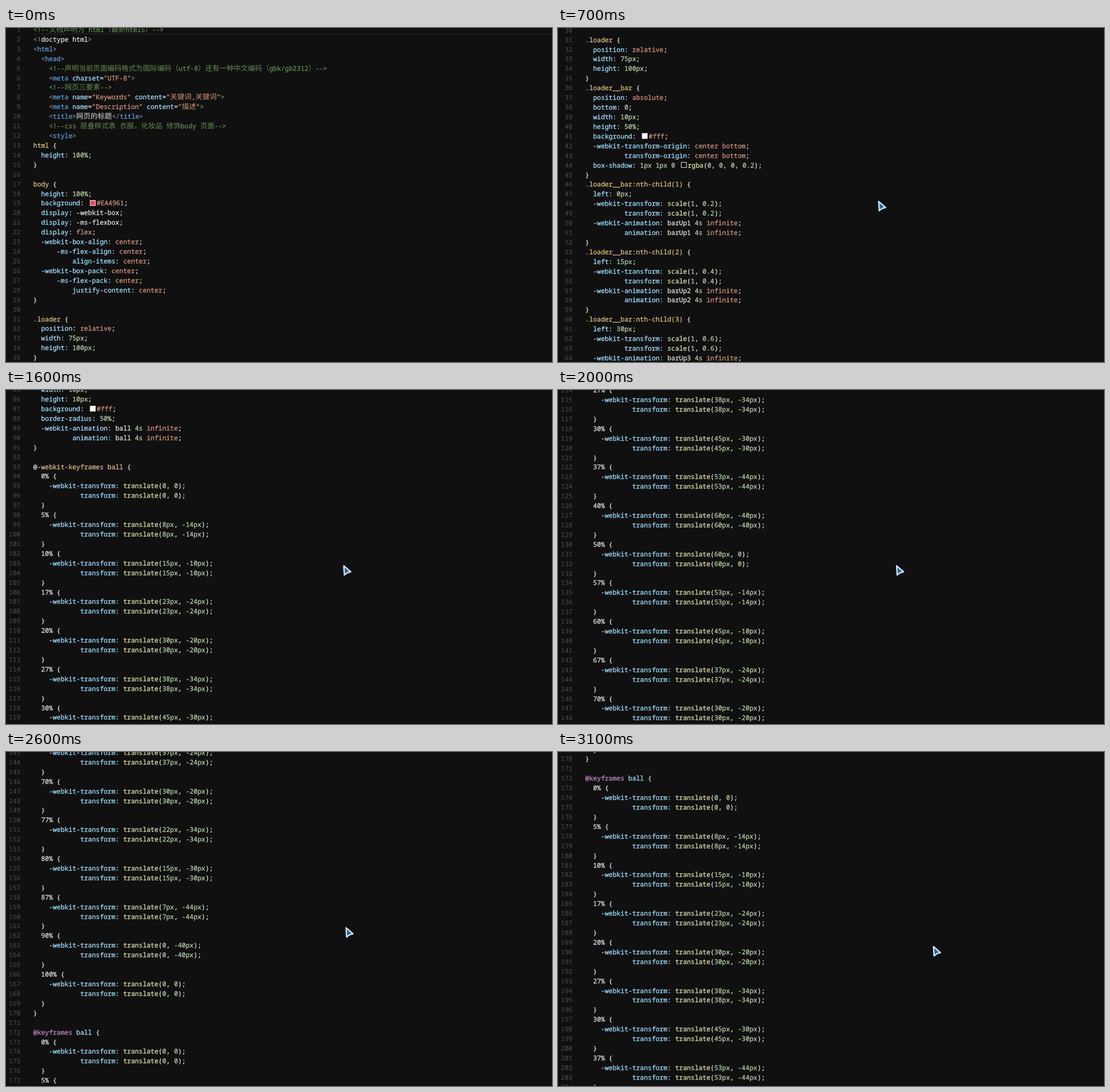
An HTML page that plays this animation: 956 px wide and 586 px high, repeating every 3.2 s.

```html
<!DOCTYPE html>
<html lang="zh">
<head>
<meta charset="utf-8">
<title>Scrolling through a stylesheet</title>
<style>
html, body { margin: 0; width: 100%; height: 100%; overflow: hidden; background: #101010; }
svg { display: block; width: 956px; height: 586px; }
text { font: 11.425px "Noto Sans Mono", monospace; white-space: pre; color: #dedede; text-rendering: geometricPrecision; }
text, tspan { fill: currentColor; stroke: currentColor; stroke-width: .3px; }
.cjk { font: 12.47px "Noto Sans CJK SC", "Noto Sans CJK", sans-serif; stroke: none; }
.no { color: #4e4e4e; stroke: none; text-anchor: end; }
.com { color: #608b4e; }
.br { color: #808080; }
.tag { color: #569cd6; }
.prop { color: #9cdcfe; }
.str { color: #ce9178; }
.sel { color: #d7ba7d; }
.num { color: #b5cea8; }
.fn { color: #dcdcaa; }
.at { color: #c586c0; }
</style>
</head>
<body>
<svg viewBox="0 0 956 586">
  <g id="code"></g>
  <g id="cursor" stroke-linejoin="round">
    <path d="M1.5 1.5L13.5 12Q7 13 2.5 17.5Z" fill="none" stroke="#2f75ad" stroke-opacity=".45" stroke-width="4"/>
    <path d="M1.5 1.5L13.5 12Q7 13 2.5 17.5Z" fill="#2f6c96" stroke="#e8f4fb" stroke-width="1.9"/>
  </g>
</svg>
<script>
const LEFT = 47.8, CHAR = 6.855, LINE = 16.92, BASE = 6.9, NOTCH = 44.53;
const FRAME = 100, FRAMES = 32;
const code = document.getElementById('code');
const cursor = document.getElementById('cursor');

const page = `<!--文档声明为 html（最新html5）-->
<!doctype html>
<html>
  <head>
    <!--声明当前页面编码格式为国际编码（utf-8）还有一种中文编码（gbk/gb2312）-->
    <meta charset="UTF-8">
    <!--网页三要素-->
    <meta name="Keywords" content="关键词,关键词">
    <meta name="Description" content="描述">
    <title>网页的标题</title>
    <!--css 层叠样式表 衣服，化妆品 修饰body 页面-->
    <style>`.split('\n');

const base = `html {
  height: 100%;
}

body {
  height: 100%;
  background: #EA4961;
  display: -webkit-box;
  display: -ms-flexbox;
  display: flex;
  -webkit-box-align: center;
      -ms-flex-align: center;
          align-items: center;
  -webkit-box-pack: center;
      -ms-flex-pack: center;
          justify-content: center;
}

.loader {
  position: relative;
  width: 75px;
  height: 100px;
}
.loader__bar {
  position: absolute;
  bottom: 0;
  width: 10px;
  height: 50%;
  background: #fff;
  -webkit-transform-origin: center bottom;
          transform-origin: center bottom;
  box-shadow: 1px 1px 0 rgba(0, 0, 0, 0.2);
}`.split('\n');

const ball = `.loader__ball {
  position: absolute;
  bottom: 10px;
  left: 0;
  width: 10px;
  height: 10px;
  background: #fff;
  border-radius: 50%;`.split('\n');

const px = n => n ? n + 'px' : '0';
const prefixed = (pad, rule) => [`${pad}-webkit-${rule};`, `${pad}        ${rule};`];
const bar = i => [
  `.loader__bar:nth-child(${i}) {`, `  left: ${15 * (i - 1)}px;`,
  ...prefixed('  ', `transform: scale(1, ${i / 5})`),
  ...prefixed('  ', `animation: barUp${i} 4s infinite`), '}'
];
const stop = (percent, x, y) => [
  `  ${percent}% {`, ...prefixed('    ', `transform: translate(${px(x)}, ${px(y)})`), '  }'
];
// The ball hops over four bars, first to the right, then back.
const hop = (i, back) => [
  ...stop(back ? 57 + 10 * i : i ? 7 + 10 * i : 5, back ? (i ? 52 - 15 * i : 53) : 8 + 15 * i, -14 - 10 * i),
  ...stop((back ? 60 : 10) + 10 * i, back ? 45 - 15 * i : 15 + 15 * i, -10 - 10 * i)
];
const hops = back => [0, 1, 2, 3].flatMap(i => hop(i, back));
const keyframes = at => [
  `${at} ball {`, ...stop(0, 0, 0), ...hops(false), ...stop(50, 60, 0), ...hops(true), ...stop(100, 0, 0), '}', ''
];
const sheet = [
  ...base, ...[1, 2, 3, 4, 5].flatMap(bar),
  ...ball, ...prefixed('  ', 'animation: ball 4s infinite'), '}', '',
  ...keyframes('@-webkit-keyframes'), ...keyframes('@keyframes')
];

const escape = s => s.replace(/&/g, '&amp;').replace(/</g, '&lt;');
const span = (kind, s, dx = 0) => s.split(/([\u3000-\u9fff\uff00-\uffef]+)/).filter(Boolean).map(run => {
  const wide = run.charCodeAt(0) > 0x2fff ? ' cjk' : '';
  return `<tspan class="${kind}${wide}" dx="${dx}">${escape(run)}</tspan>`;
}).join('');

// Colours each match by the first named group that caught it.
function paint(s, rule) {
  let out = '', end = 0;
  for (const m of s.matchAll(rule)) {
    out += span('', s.slice(end, m.index));
    const kind = Object.keys(m.groups).find(k => m.groups[k] !== undefined);
    out += span(kind, m[0], /^(#|rgba)/.test(m[0]) ? 15.2 : 0);
    end = m.index + m[0].length;
  }
  return out + span('', s.slice(end));
}

const htmlRule = /(?<com><!--.*-->)|(?<str>"[^"]*")|(?<tag>(?<=<\/?)\w+)|(?<br><\/?!?|>)|(?<prop>\w+(?==))/g;
const valueRule = /(?<plain>-[a-z][\w-]*|barUp\d|ball)|(?<fn>[a-z]+(?=\())|(?<str>#\w+|[a-z]+)|(?<num>-?[\d.]+(?:px|s|%)?)/g;

function paintCss(s) {
  let m;
  if ((m = s.match(/^(\s*[\w-]+)(: )(.*)$/))) return span('prop', m[1]) + span('', m[2]) + paint(m[3], valueRule);
  if ((m = s.match(/^@(-.*)( \{)$/))) return span('', '@') + span('sel', m[1]) + span('', m[2]);
  if ((m = s.match(/^(@\w+)( \w+)( \{)$/))) return span('at', m[1]) + span('prop', m[2]) + span('', m[3]);
  if ((m = s.match(/^(\S.*)( \{)$/))) return span('sel', m[1]) + span('', m[2]);
  return span('', s);
}

function swatch(s, y) {
  const m = s.match(/: .*?(#\w+|rgba\(.*\))/);
  if (!m) return '';
  const x = LEFT + s.indexOf(m[1]) * CHAR + 3.6;
  return `<rect x="${x}" y="${y - 8.9}" width="9" height="9" fill="${m[1]}" stroke="#eee"/>`;
}

const row = (s, i, body, extra = '') => {
  const y = BASE + i * LINE;
  return `<text class="no" x="25.4" y="${y}">${i + 1}</text><text x="${LEFT}" y="${y}">${body}</text>${extra}`;
};
code.innerHTML = '<path d="M48 10.5H956" stroke="#282828"/>' +
  page.map((s, i) => row(s, i, paint(s, htmlRule))).join('') +
  sheet.map((s, j) => {
    const i = j + page.length;
    return row(s, i, paintCss(s), swatch(s, BASE + i * LINE));
  }).join('');

// [step, wheel notches, pointer x, pointer y], linear in between
const keys = [
  [0, 0, 732, 346], [3, 5, 534, 298], [5, 8, 534, 298], [7, 11, 560, 303], [11, 20, 582, 308],
  [16, 32, 590, 307], [23, 51, 592.5, 307], [28, 56, 595, 307], [30, 61, 597, 308], [31, 64, 656, 340]
];
const pauses = [4, 6, 14, 19, 21, 24];

function pose(step) {
  const i = Math.max(1, keys.findIndex(k => k[0] >= step));
  const a = keys[i - 1], b = keys[i];
  const u = (step - a[0]) / (b[0] - a[0]);
  return a.map((v, n) => v + (b[n] - v) * u);
}

function draw(ms) {
  let step = Math.floor(ms / FRAME) % FRAMES;
  if (pauses.includes(step)) step--;
  const [, notches, x, y] = pose(step);
  code.setAttribute('transform', `translate(0 ${-Math.round(notches) * NOTCH})`);
  cursor.setAttribute('transform', `translate(${x} ${y})`);
  cursor.setAttribute('visibility', step ? 'visible' : 'hidden');
}

const start = performance.now();
function tick() {
  draw(performance.now() - start);
  requestAnimationFrame(tick);
}
tick();
</script>
</body>
</html>
```
